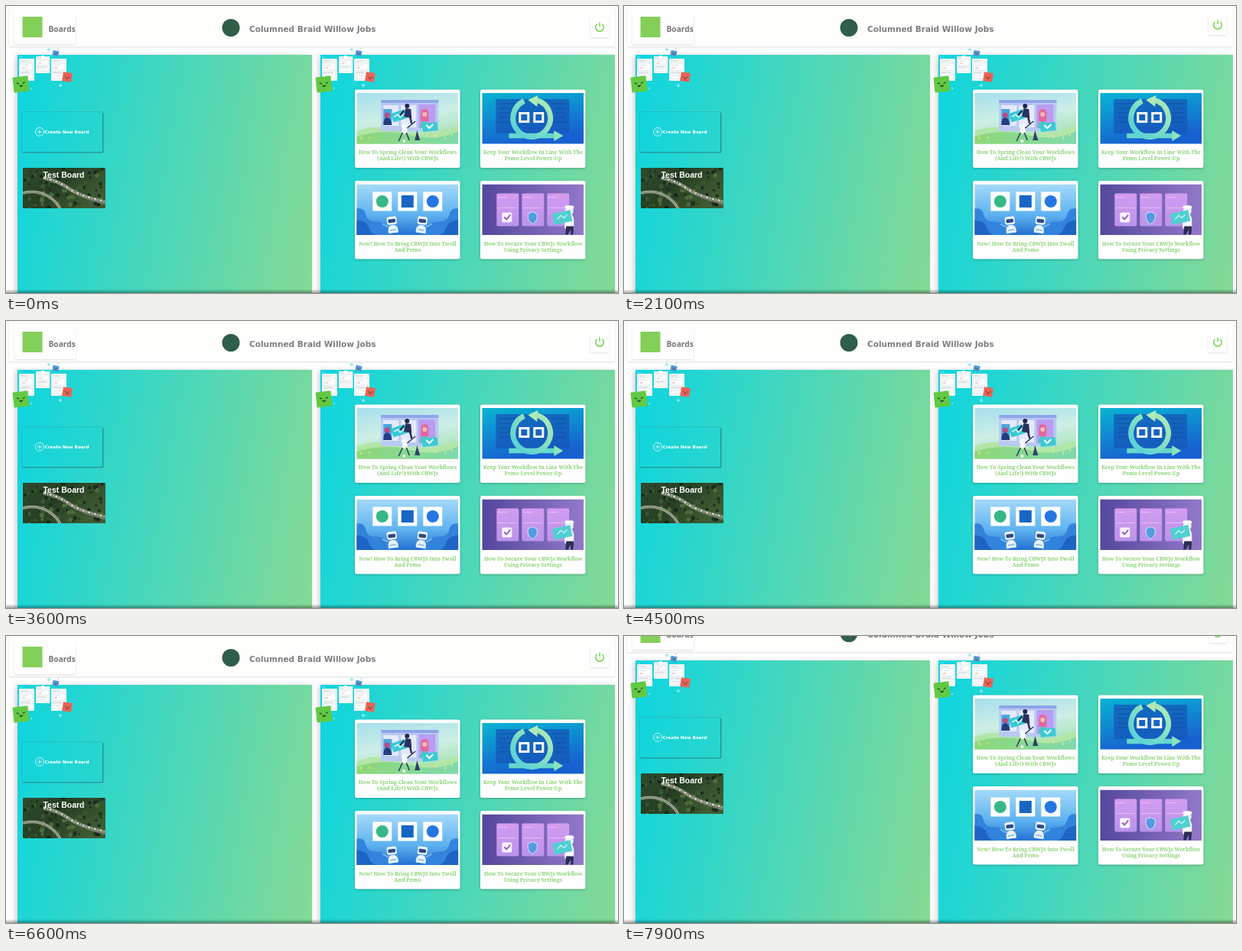
An HTML page for the animation above (8 s loop, 800 by 376 pixels).

```html
<!DOCTYPE html>
<html lang="en">
<head>
<meta charset="utf-8">
<title>Boards</title>
<style>
  html, body { margin: 0; width: 100%; height: 100%; overflow: hidden; background: #fefefe; }
  svg { display: block; width: 800px; height: 376px; }
  .lift { filter: drop-shadow(0 1px 1.5px rgba(0, 0, 0, .24)); }
  .soft { filter: drop-shadow(0 1px 1px rgba(0, 0, 0, .13)); }
  .panel { filter: drop-shadow(-2px 1px 3px rgba(0, 0, 0, .2)); }
  .sans { font: bold 10.5px "DejaVu Sans", sans-serif; fill: #7d7d7d; }
  .caption { font: bold 6.8px "Noto Serif", serif; fill: #8ad375; text-anchor: middle; }
</style>
</head>
<body>
<svg viewBox="0 0 800 376">
  <defs>
    <linearGradient id="sea" gradientUnits="userSpaceOnUse" x1="0" y1="0" x2="429" y2="76">
      <stop stop-color="#0cd5e0"/><stop offset="1" stop-color="#86d994"/>
    </linearGradient>
    <linearGradient id="sky" x2=".3" y2="1">
      <stop stop-color="#a6dfec"/><stop offset=".55" stop-color="#cdeee6"/><stop offset="1" stop-color="#a8e3b4"/>
    </linearGradient>
    <linearGradient id="meadow"><stop stop-color="#8ed778"/><stop offset="1" stop-color="#7fd9ad"/></linearGradient>
    <linearGradient id="deep" x2=".35" y2="1">
      <stop stop-color="#08b4d3"/><stop offset="1" stop-color="#1760d0"/>
    </linearGradient>
    <linearGradient id="ribbon" x1="0" y1="1" x2="1" y2="0">
      <stop stop-color="#4ecfd9"/><stop offset="1" stop-color="#b2ebb3"/>
    </linearGradient>
    <linearGradient id="bay" x2="0" y2="1">
      <stop stop-color="#a4d9f8"/><stop offset=".6" stop-color="#5eb2f0"/><stop offset="1" stop-color="#2370d2"/>
    </linearGradient>
    <linearGradient id="violet"><stop stop-color="#54479d"/><stop offset="1" stop-color="#9279c9"/></linearGradient>
    <linearGradient id="lilac" x2="0" y2="1"><stop stop-color="#d59cef"/><stop offset="1" stop-color="#b994ea"/></linearGradient>
    <linearGradient id="forest" x2="1" y2=".5">
      <stop stop-color="#304a2c"/><stop offset=".5" stop-color="#263f23"/><stop offset="1" stop-color="#3f5b33"/>
    </linearGradient>
    <linearGradient id="fold" x2="0" y2="1">
      <stop stop-color="#000" stop-opacity="0"/><stop offset="1" stop-color="#000" stop-opacity=".36"/>
    </linearGradient>
    <clipPath id="picture"><rect width="133" height="66.500"/></clipPath>
    <clipPath id="photo"><rect width="108" height="53" rx="1"/></clipPath>

    <path id="spark" d="M0-3Q.3-.3 3 0Q.3.3 0 3Q-.3.3-3 0Q-.3-.3 0-3Z" fill="#8eeaf4"/>
    <g id="list">
      <rect width="20" height="29" rx="1" fill="#f3f5f6"/>
      <path d="M2 3h9M2 18h12" stroke="#c2c9ce" stroke-width=".8"/>
      <path d="M2 6h16v9H2zM2 20h16v6H2z" fill="#fff" stroke="#d9dfe3" stroke-width=".6"/>
      <path d="M4 8.500h8M4 22.500h10" stroke="#ccd4d9" stroke-width=".7"/>
      <path d="M4 12h4" stroke="#ee9990"/>
    </g>
    <g id="face" fill="none" stroke="#26462a" stroke-linecap="round">
      <path d="M-5-1l2 1M5-1l-2 1" stroke-width="1.300"/>
      <path d="M-2 3Q0 6 2 3Z" fill="#26462a" stroke-width=".8"/>
    </g>
    <g id="stickers">
      <path d="M2 3h5" stroke="#66e4ee"/>
      <use href="#list" x="2" y="5"/>
      <use href="#list" transform="translate(24 2) scale(.92 .76)"/>
      <use href="#list" x="44" y="5"/>
      <rect x="31" y="1" width="4" height="4" fill="#fff"/>
      <use href="#spark" x="41" y="-7"/><use href="#spark" x="56" y="40"/>
      <use href="#spark" transform="translate(18 44) scale(.6)"/><use href="#spark" transform="translate(53 -8) scale(.5)"/>
      <g transform="translate(50 -2) rotate(10)">
        <rect x="-4" y="-3.500" width="8" height="7" fill="#5797d6"/>
        <use href="#face" transform="scale(.42)"/>
      </g>
      <g transform="translate(65 29) rotate(9)">
        <rect x="-6" y="-6" width="12" height="12" fill="#ed6256"/>
        <use href="#face" transform="scale(.6)"/>
      </g>
      <g transform="translate(4.500 38.500) rotate(-6)">
        <rect x="-10" y="-10" width="20" height="20" rx="1" fill="#62c943"/>
        <use href="#face" y="-1"/>
      </g>
    </g>

    <g id="spring">
      <rect width="133" height="67" fill="url(#sky)"/>
      <path d="M0 50Q25 40 55 50T133 43V67H0Z" fill="#b2e6a6"/>
      <path d="M0 57Q35 46 70 55T133 50V67H0Z" fill="url(#meadow)"/>
      <rect x="32" y="9" width="75" height="41" rx="1" fill="#b8c9f2"/>
      <path d="M32 9h75v4H32z" fill="#8fa5e8"/>
      <path d="M35 16h20v27H35zM58 16h20v29H58z" fill="#e4eafc"/>
      <path d="M81 15h22v31H81z" fill="#ba9cf0"/>
      <path d="M35 21h11v20H35z" fill="#4ba5dd"/>
      <path d="M35 42q0-10 5-10t6 10z" fill="#243c80"/>
      <circle cx="40" cy="29" r="3.500" fill="#be497f"/>
      <path d="M84 37V27q0-6 5-6t5 6v10z" fill="#e4669d"/>
      <circle cx="89" cy="28" r="3" fill="#ffc2ac"/>
      <path d="M83 46q0-9 6-9t6 9z" fill="#50c4bd"/>
      <rect x="46" y="24" width="19" height="12" fill="#37cad4" transform="rotate(-17 55 30)"/>
      <path d="M49 31l5-3 3 4 5-5" stroke="#dff8f5" stroke-width="1.500" fill="none"/>
      <circle cx="66" cy="17" r="3" fill="#20264d"/>
      <path d="M62 31l2-11 7 1 1 12z" fill="#29305e"/>
      <path d="M62 23l-5 6M70 32l2 8" stroke="#29305e" stroke-width="2.500"/>
      <rect x="86" y="39" width="20" height="11" rx="1" fill="#3bcbd2" transform="rotate(-7 96 45)"/>
      <path d="M91 42l4 4 5-5" stroke="#fff" stroke-width="2" fill="none"/>
      <path d="M59 43q4-5 8 0l-1 10h-6z" fill="#f5f8fb"/>
      <path d="M60 52l-5 11M65 52l4 10M66 46l11-9" stroke="#303553" stroke-width="1.500"/>
      <path d="M76 62l3-13 4 13z" fill="#314166"/>
      <circle cx="62" cy="63" r="2" fill="#fff"/>
      <path d="M6 61v-4M17 60v-3M103 59v-4M116 61v-4M125 57v-3" stroke="#f3e878" stroke-width="1.200"/>
    </g>

    <g id="loop">
      <rect width="133" height="67" fill="url(#deep)"/>
      <rect x="18" y="8" width="96" height="45" rx="1" fill="#1557b7" opacity=".72"/>
      <path d="M22 14h26M22 20h20M22 26h18M22 32h18M22 38h20M91 14h18M95 20h14M96 26h13M96 32h13M93 38h16"
        stroke="#0e4798" stroke-width="1.200" opacity=".7"/>
      <path d="M35 56H96" stroke="#65d8cc" stroke-width="6.500"/>
      <path d="M94 49l12 7-12 7z" fill="#89e4be"/>
      <path d="M72 9.500A24.500 24.500 0 1 1 55 10.500" fill="none" stroke="url(#ribbon)" stroke-width="7"/>
      <path d="M60 9l13-6-1 15z" fill="#b0eab6"/>
      <path d="M48 25h14v14H48zM67 25h14v14H67z" fill="#f9fcff"/>
      <path d="M51 28h8v8h-8zM70 28h8v8h-8z" fill="#1765c0"/>
    </g>

    <g id="helper">
      <path d="M-8 20q-1-11 6-13h5q7 3 5 13z" fill="#e8f1fb"/>
      <rect x="-8" y="-7" width="16" height="13" rx="3" fill="#edf6ff"/>
      <rect x="-6" y="-3" width="12" height="6" rx="2" fill="#304986"/>
      <path d="M-7 9l-9-6M-5 15h10" stroke="#7cbbe4" stroke-width="2"/>
    </g>
    <g id="links">
      <rect width="133" height="67" fill="url(#bay)"/>
      <path d="M0 32q10-2 12 8t14 9q10 0 12 7t10 11H0zM133 32q-10-2-12 8t-14 9q-10 0-12 7t-10 11h48z" fill="#3183dc"/>
      <path d="M0 47q13 1 16 10t12 10H0zM133 47q-13 1-16 10t-12 10h28z" fill="#1f64c4"/>
      <path d="M21 10h25v25H21zM54 10h25v25H54zM87 10h25v25H87z" fill="#fcfeff"/>
      <circle cx="33.500" cy="22.500" r="8" fill="#35b885"/>
      <rect x="58.500" y="14.500" width="16" height="16" fill="#1766c4"/>
      <circle cx="99.500" cy="22.500" r="8" fill="#2676e2"/>
      <use href="#helper" transform="translate(46 48) rotate(-8) scale(.8)"/>
      <use href="#helper" transform="translate(86 48) rotate(8) scale(-.8 .8)"/>
    </g>

    <g id="vaultCard">
      <rect width="29" height="43" rx="2" fill="url(#lilac)"/>
      <path d="M2 5h11M2 19h25" stroke="#f0c9ff" stroke-width="1.200" stroke-dasharray="3 1"/>
      <rect x="2" y="8" width="25" height="8" fill="#ca9af0"/>
    </g>
    <g id="vault">
      <rect width="133" height="67" fill="url(#violet)"/>
      <use href="#vaultCard" x="19" y="12"/><use href="#vaultCard" x="52" y="12"/><use href="#vaultCard" x="85" y="12"/>
      <rect x="26" y="37" width="13" height="13" rx="2" fill="#faf2ff"/>
      <path d="M29 43l3 3 5-6" fill="none" stroke="#8658ba" stroke-width="1.800"/>
      <path d="M66 36l6 3v5q0 5-6 8-6-3-6-8v-5z" fill="#539be0" stroke="#d9e0fc"/>
      <path d="M108 58V46q1-8 6-8t6 9v11z" fill="#f7f9ff"/>
      <circle cx="114" cy="35" r="5.500" fill="#eef2fb"/>
      <path d="M108 31q0-4 6-3 7-1 6 4z" fill="#fff"/>
      <path d="M110 55h10l-1 11h-3v-7l-4 7h-3z" fill="#292d51"/>
      <rect x="93" y="36" width="24" height="15" fill="#51cfd1" transform="rotate(-12 105 44)"/>
      <path d="M98 46l5-5 4 3 4-4" stroke="#c5f0ef" stroke-width="1.500" fill="none"/>
    </g>
  </defs>

  <g id="page">
    <rect class="soft" x="4" y="-4" width="792" height="57" fill="#fefefd"/>
    <g id="brand">
      <rect class="soft" x="11" y="10" width="80" height="40" rx="2" fill="#fefefe"/>
      <rect id="mark" x="21.500" y="14" width="26" height="27" fill="#84cf58"/>
      <text x="55.500" y="33.800" style="font:600 10.200px 'Noto Sans',sans-serif" fill="#777">Boards</text>
    </g>
    <circle cx="294" cy="28.500" r="11.500" fill="#2f5e49"/>
    <text class="sans" x="318" y="34">Columned Braid Willow Jobs</text>
    <g id="power">
      <rect class="soft" x="764" y="14" width="24" height="27" rx="2" fill="#fefefe"/>
      <path d="M772.700 23.800A5.300 5.300 0 1 0 779.300 23.800M776 21.500V27" fill="none" stroke="#69d344" stroke-width="1.400"/>
    </g>

    <g transform="translate(15 64)">
      <rect class="panel" width="385" height="400" fill="url(#sea)"/>
      <use href="#stickers"/>
    </g>
    <g transform="translate(411 64)">
      <rect class="panel" width="385" height="400" fill="url(#sea)"/>
      <use href="#stickers"/>
    </g>

    <rect x="20.500" y="138.500" width="106" height="53" rx="2" fill="#12d2da" fill-opacity=".2"
      stroke="#2fa8aa" stroke-width=".6"/>
    <path d="M21.500 192H125Q126.800 192 126.800 190V140" fill="none" stroke="#1f6f72" stroke-opacity=".65" stroke-width="1.200"/>
    <g fill="none" stroke="#effdff" stroke-width=".8">
      <circle cx="44" cy="164.800" r="5.500"/><path d="M41 164.800h6M44 161.800v6"/>
    </g>
    <text x="50.500" y="166.800" class="sans" style="font-size:5.700px;fill:#fff">Create New Board</text>

    <g transform="translate(22 212)" clip-path="url(#photo)">
      <rect width="108" height="53" fill="url(#forest)"/>
      <g id="trees"></g>
      <path d="M27 13Q46 17 60 27T108 46" fill="none" stroke="#737d68" stroke-width="5"/>
      <path d="M27 13Q46 17 60 27T108 44" fill="none" stroke="#d0d3c8" stroke-width="2.500" stroke-dasharray="3 2 1 2"/>
      <path d="M0 33Q18 29 31 36T49 54" fill="none" stroke="#a6ab9a" stroke-width="3.500"/>
      <path d="M0 33Q18 29 31 36T49 54" fill="none" stroke="#707969" stroke-width="1"/>
    </g>
    <text x="75.500" y="224.700" text-anchor="middle" fill="#fff" style="font:bold 10.500px 'Liberation Sans',sans-serif">Test Board</text>
    <g id="cards"></g>
  </g>
  <rect y="371" width="800" height="5" fill="url(#fold)"/>
</svg>
<script>
  const LOOP = 8000;
  const byId = id => document.getElementById(id);
  const page = byId('page'), brand = byId('brand'), mark = byId('mark'), power = byId('power');

  const articles = [
    ['spring', 'How To Spring Clean Your Workflows', '(And Life!) With CBWJs'],
    ['loop', 'Keep Your Workflow In Line With The', 'Pemo Level Power-Up'],
    ['links', 'New! How To Bring CBWJS Into Twoll', 'And Pemo'],
    ['vault', 'How To Secure Your CBWJs Workflow', 'Using Privacy Settings']
  ];
  byId('cards').innerHTML = articles.map(([art, first, second], i) => `
    <g transform="translate(${456 + i % 2 * 164} ${109.5 + (i >> 1) * 119.5})">
      <rect class="lift" width="137.500" height="102.500" rx="2.500" fill="#fefefe"/>
      <g transform="translate(2.300 4.500)" clip-path="url(#picture)"><use href="#${art}"/></g>
      <text class="caption" x="69" y="84.700">${first}</text>
      <text class="caption" x="69" y="92.500">${second}</text>
    </g>`).join('');

  let seed = 7;
  const random = () => (seed = seed * 16807 % 2147483647) / 2147483647;
  const greens = ['#1f3020', '#4c6b3c', '#3a5830', '#17271b'];
  byId('trees').innerHTML = Array.from({ length: 90 }, (_, i) =>
    `<circle cx="${random() * 108}" cy="${random() * 53}" r="${1 + random() * 2}" fill="${greens[i % 4]}"/>`).join('');

  const clamp = v => Math.max(0, Math.min(1, v));
  const ease = v => v * v * (3 - 2 * v);
  const ramp = (t, from, length) => ease(clamp((t - from) / length));
  const hover = (t, from, to) => ramp(t, from, 150) - ramp(t, to, 150);

  function draw(t) {
    page.setAttribute('transform', `translate(0 ${-32 * ramp(t, 6800, 350)})`);
    const nudge = hover(t, 800, 1250);
    brand.setAttribute('transform', `translate(${-nudge} 0)`);
    mark.setAttribute('width', 26 + nudge);
    power.setAttribute('transform', `translate(0 ${-3 * hover(t, 1900, 2400)})`);
  }

  const start = performance.now();
  function tick(now) {
    draw(Math.max(0, now - start) % LOOP);
    requestAnimationFrame(tick);
  }
  draw(0);
  requestAnimationFrame(tick);
</script>
</body>
</html>
```
